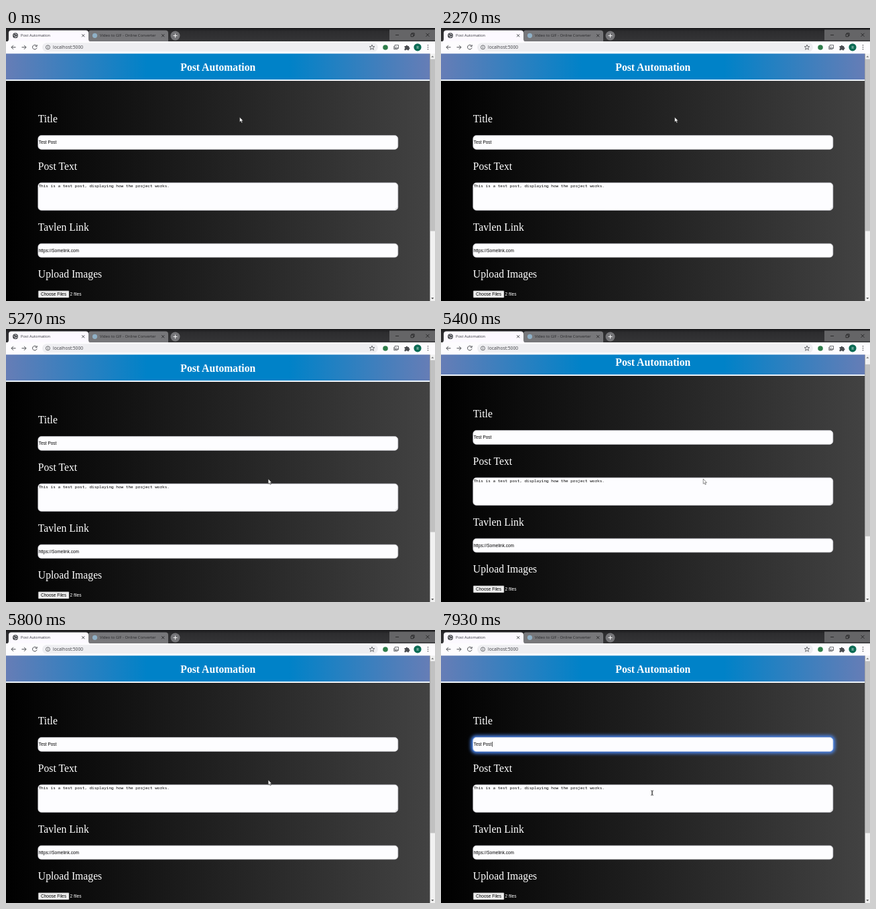
These frames come from a looping animation (640x408 px, 8000 ms). An HTML page:

```html
<!DOCTYPE html>
<html lang="en">
<head>
<meta charset="utf-8">
<title>Post Automation</title>
<style>
  html, body { margin: 0; width: 100%; height: 100%; overflow: hidden; background: #000; }
  svg { display: block; width: 100vw; height: 100vh; }
  text { white-space: pre; }
  .ui { font-family: "Open Sans", "Noto Sans", sans-serif; }
  .serif { font: 15.7px "Liberation Serif", "Times New Roman", serif; fill: #fff; }
  .sans { font: 6.5px "Liberation Sans", Arial, sans-serif; }
  .mono { font: 6.04px "Noto Sans Mono", "Liberation Mono", monospace; }
  .line { fill: none; stroke: #4a4c50; stroke-width: 1; }
</style>
</head>
<body>
<svg viewBox="0 0 640 408">
  <defs>
    <linearGradient id="banner">
      <stop offset="0" stop-color="#667db6"/>
      <stop offset=".333" stop-color="#0082c8"/>
      <stop offset=".667" stop-color="#0082c8"/>
      <stop offset="1" stop-color="#667db6"/>
    </linearGradient>
    <linearGradient id="night">
      <stop offset="0" stop-color="#000"/>
      <stop offset="1" stop-color="#434343"/>
    </linearGradient>
    <linearGradient id="strip" x2="0" y2="1">
      <stop offset="0" stop-color="#19191b"/>
      <stop offset=".25" stop-color="#2d2d2f"/>
      <stop offset="1" stop-color="#343436"/>
    </linearGradient>
    <filter id="blur" x="-5%" y="-80%" width="110%" height="260%">
      <feGaussianBlur stdDeviation="2.4"/>
    </filter>
    <clipPath id="view"><rect y="38" width="632.5" height="370"/></clipPath>
  </defs>

  <!-- page -->
  <rect y="38" width="640" height="370" fill="url(#night)"/>
  <g clip-path="url(#view)">
    <g id="page">
      <rect y="38" width="632.5" height="39" fill="url(#banner)"/>
      <rect y="77" width="632.5" height="2" fill="#eef5fc"/>
      <text class="serif" x="316.3" y="63.5" text-anchor="middle" font-weight="bold" style="font-weight:bold">Post Automation</text>
      <g id="glow" opacity="0">
        <rect x="46" y="159" width="540.5" height="24" rx="6.5" fill="#4a86f0" stroke="#4a86f0" stroke-width="3" filter="url(#blur)"/>
        <rect x="47" y="160" width="538.5" height="22" rx="5.5" fill="#5b92f0"/>
      </g>
      <g id="form"></g>
      <path d="M580.5 271.2l3-3M582 271.4l1.5-1.5" stroke="#999" stroke-width=".4"/>
      <text class="sans" x="48.7" y="173">Test Post</text>
      <text class="mono" x="48.5" y="238.2">This is a test post, displaying how the project works.</text>
      <text class="sans" x="48.7" y="334.6">https://Somelink.com</text>
      <rect id="caret" x="76.2" y="167" width=".7" height="7.5"/>
      <rect x="48.2" y="392.8" width="45.8" height="10.2" rx=".8" fill="#efefef" stroke="#767676" stroke-width=".5"/>
      <text class="sans" x="71" y="400.2" text-anchor="middle">Choose Files</text>
      <text class="sans" x="95.5" y="400.2" fill="#fff">2 files</text>
    </g>
  </g>

  <!-- scrollbar -->
  <rect x="632.5" y="38" width="7.5" height="370" fill="#f1f1f1"/>
  <rect id="thumb" x="633" y="46.5" width="7" height="257" fill="#c1c1c1"/>
  <path d="M634.3 43.8l2-2.2 2 2.2z" fill="#777"/>
  <path d="M634.3 403l2 2.2 2-2.2z" fill="#505050"/>

  <!-- tab strip -->
  <rect width="640" height="20.5" fill="url(#strip)"/>
  <rect x="572" y="2.5" width="68" height="16" fill="#656567"/>
  <path d="M123 20V7q0-3.5 3.5-3.5H238q4 0 4 4V20z" fill="#77777a"/>
  <path d="M1 20.5q3-.5 3-4V7.5q0-4 4-4h111q4 0 4 4v9q0 3.500 3 4z" fill="#fcf9ff"/>
  <circle cx="14" cy="11.300" r="4" fill="#46484c"/>
  <path d="M11 10.500q2 .2 2.600 1.500t-.2 2.700M13.200 8q.6 1.800 3.300 1.600M15 13.800q.2-2 2.300-2" fill="none" stroke="#fcf9ff" stroke-width=".8"/>
  <circle cx="132.500" cy="11.300" r="3.600" fill="#8fb0c6"/>
  <g class="ui" font-size="5.65">
    <text x="22" y="13.300" fill="#34353a">Post Automation</text>
    <text x="140" y="13.300" font-size="5.8" fill="#29292c">Video to GIF - Online Converter</text>
  </g>
  <path d="M113.200 9.300l4 4m0-4l-4 4" class="line"/>
  <path d="M232.200 9.300l4 4m0-4l-4 4" class="line" style="stroke:#2c2c2e"/>
  <circle cx="252.500" cy="11.500" r="7" fill="#757578"/>
  <path d="M249.500 11.500h6m-3-3v6" stroke="#f2f2f2" stroke-width="1"/>
  <g fill="none" stroke="#1d1d1f" stroke-width=".8">
    <path d="M581 10.500h5M626.500 7.800l5 5m0-5l-5 5"/>
    <path d="M604 9h3.800v3.800H604zM605.300 9V7.700h3.800v3.800h-1.300"/>
  </g>

  <!-- toolbar -->
  <rect y="20" width="640" height="18.300" fill="#fdfcfe"/>
  <rect x="54" y="22.300" width="501" height="13" rx="6.500" fill="#eeeef1"/>
  <g class="line">
    <path d="M14.500 28.800H8m3-3l-3 3 3 3"/>
    <path d="M23.500 28.800H30m-3-3l3 3-3 3"/>
    <path d="M45.300 26.400a3.300 3.300 0 1 0 .8 3M46.200 25v2.400h-2.400"/>
    <circle cx="62.500" cy="28.800" r="3" stroke-width=".8"/>
    <path d="M62.500 28.400v2M62.500 26.800v.8" stroke-width=".8"/>
    <path id="star" stroke-width=".8"/>
    <path d="M580 25.500h5.500v5h-5.500zM578.800 27v4.800h5.500M581 29.600l1.500-1.500 2 1.500" stroke-width=".8"/>
  </g>
  <text class="ui" x="70" y="31.200" font-size="6.700" fill="#3c3d42">localhost:5000</text>
  <circle cx="566" cy="29" r="3.800" fill="#2f7d4a"/>
  <path d="M594.500 27h2.100a1.300 1.300 0 1 1 2.600 0h2v2a1.300 1.300 0 1 1 0 2.600v1.600h-2.300a1.200 1.200 0 0 0-2.300 0h-2.100v-2.200a1.200 1.200 0 0 0 0-2.300z" fill="#4a4c50"/>
  <circle cx="614" cy="28.800" r="5.600" fill="#0b6b54"/>
  <text class="ui" x="614" y="31" font-size="6" fill="#e8f5f0" text-anchor="middle">R</text>
  <g fill="#4a4c50">
    <circle cx="629.500" cy="25.800" r=".8"/><circle cx="629.500" cy="28.800" r=".8"/><circle cx="629.500" cy="31.800" r=".8"/>
  </g>

  <!-- pointer -->
  <path id="arrow" d="M0 0v7.400l1.700-1.500 1.200 2.700 1.300-.6-1.200-2.500h2.200z" fill="#fff" stroke="#222" stroke-width=".5"/>
  <path id="beam" d="M-2-3.500q2 0 2 1v5q0 1-2 1M2-3.500q-2 0-2 1v5q0 1 2 1" fill="none" stroke="#111" stroke-width=".7"/>
</svg>
<script>
const LOOP = 8000, FOCUS = 6560, SCROLL_ON = 5330, SCROLL_OFF = 5740;
const $ = id => document.getElementById(id);
const set = (id, name, value) => $(id).setAttribute(name, value);

// label, baseline, field top, field height
const fields = [
  ["Title", 141, 160.6, 20.8],
  ["Post Text", 211.5, 231.2, 41.3],
  ["Tavlen Link", 302.8, 322.2, 20.6],
  ["Upload Images", 373.2]
];
$("form").innerHTML = fields.map(([label, base, top, h]) =>
  `<text class="serif" x="47.8" y="${base}">${label}</text>` +
  (top ? `<rect x="47.8" y="${top}" width="537" height="${h}" rx="5" fill="#fdfdff" stroke="#c9cad2" stroke-width=".6"/>` : "")
).join("");

const star = Array.from({ length: 10 }, (_, i) => {
  const r = i % 2 ? 1.7 : 4, a = i * Math.PI / 5;
  return (546 + r * Math.sin(a)).toFixed(2) + " " + (29 - r * Math.cos(a)).toFixed(2);
});
set("star", "d", "M" + star.join("L") + "z");

// time, x, y of the pointer
const path = [
  [0, 348.6, 133.2], [3670, 348.6, 133.2], [4400, 391.2, 224],
  [5840, 391.2, 224], [6200, 330, 176], [7130, 330, 176],
  [7600, 315, 243.5], [LOOP, 315, 243.5]
];
const clamp = v => Math.max(0, Math.min(1, v));
const ease = v => v * v * (3 - 2 * v);

function pointerAt(t) {
  const i = path.findIndex(p => p[0] > t);
  const [t0, x0, y0] = path[i - 1], [t1, x1, y1] = path[i];
  const k = ease((t - t0) / (t1 - t0));
  return [x0 + (x1 - x0) * k, y0 + (y1 - y0) * k];
}

function draw(t) {
  const scroll = t >= SCROLL_ON && t < SCROLL_OFF ? 9 : 0;
  set("page", "transform", `translate(0 ${-scroll})`);
  set("thumb", "y", 46.5 + scroll * 0.7);

  const since = t - FOCUS;
  set("glow", "opacity", ease(clamp(since / 150)));
  set("caret", "opacity", since >= 0 && since % 1000 < 500 ? 1 : 0);

  const [x, y] = pointerAt(t);
  const inField = y < 224 || y > 224.1
    ? fields.some(f => f[2] && y > f[2] && y < f[2] + f[3]) : false;
  set("arrow", "transform", `translate(${x} ${y})`);
  set("beam", "transform", `translate(${x} ${y})`);
  set("arrow", "opacity", inField ? 0 : 1);
  set("beam", "opacity", inField ? 1 : 0);
}

const start = performance.now();
function tick() {
  draw((performance.now() - start) % LOOP);
  requestAnimationFrame(tick);
}
draw(0);
tick();
</script>
</body>
</html>
```
